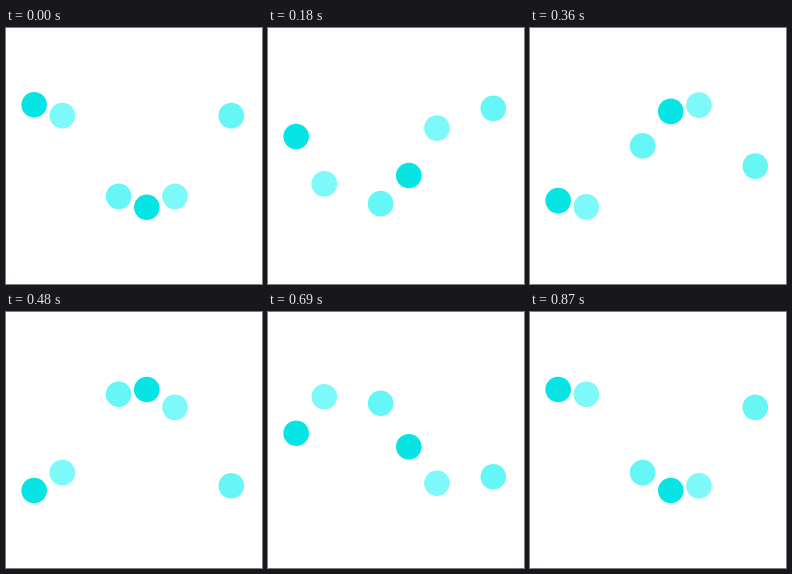
An HTML page for the animation above (0.9 s loop, 256 by 256 pixels).

```html
<!DOCTYPE html>
<html lang="en">
<head>
<meta charset="utf-8">
<title>Wave loader</title>
<style>
  html, body { margin: 0; width: 100%; height: 100%; overflow: hidden; background: #fff; }
  svg { display: block; width: 100%; height: 100%; }
</style>
</head>
<body>
<svg viewBox="0 0 256 256"></svg>
<script>
const LOOP = 900, STEP = 30;
const TOP = 76.8, TRAVEL = 102.4, SPACING = 28.16, RADIUS = 12.8;
const COLORS = ['#06e4e3', '#7cf9f8', null, '#66f6f6'];
const svg = document.querySelector('svg');

const dots = [];
for (let i = 0; i < 8; i++) {
  const fill = COLORS[i % 4];
  if (!fill) continue;
  const el = document.createElementNS('http://www.w3.org/2000/svg', 'circle');
  el.setAttribute('cx', SPACING * (i + 1));
  el.setAttribute('r', RADIUS);
  el.setAttribute('fill', fill);
  svg.append(el);
  dots.push({ el, phase: i / 8 });
}

// cubic-bezier(.5, 0, .5, 1), solved for x by bisection
function ease(x) {
  let lo = 0, hi = 1;
  for (let i = 0; i < 24; i++) {
    const s = (lo + hi) / 2;
    if (1.5 * s * (1 - s) + s ** 3 < x) lo = s; else hi = s;
  }
  return lo * lo * (3 - 2 * lo);
}

function draw(now) {
  const time = Math.floor((now % LOOP) / STEP) * STEP / LOOP;
  for (const { el, phase } of dots) {
    const p = (time + phase) % 1;
    el.setAttribute('cy', TOP + TRAVEL * ease(1 - Math.abs(1 - 2 * p)));
  }
}

const start = performance.now();
function tick() {
  draw(performance.now() - start);
  requestAnimationFrame(tick);
}
tick();
</script>
</body>
</html>
```
